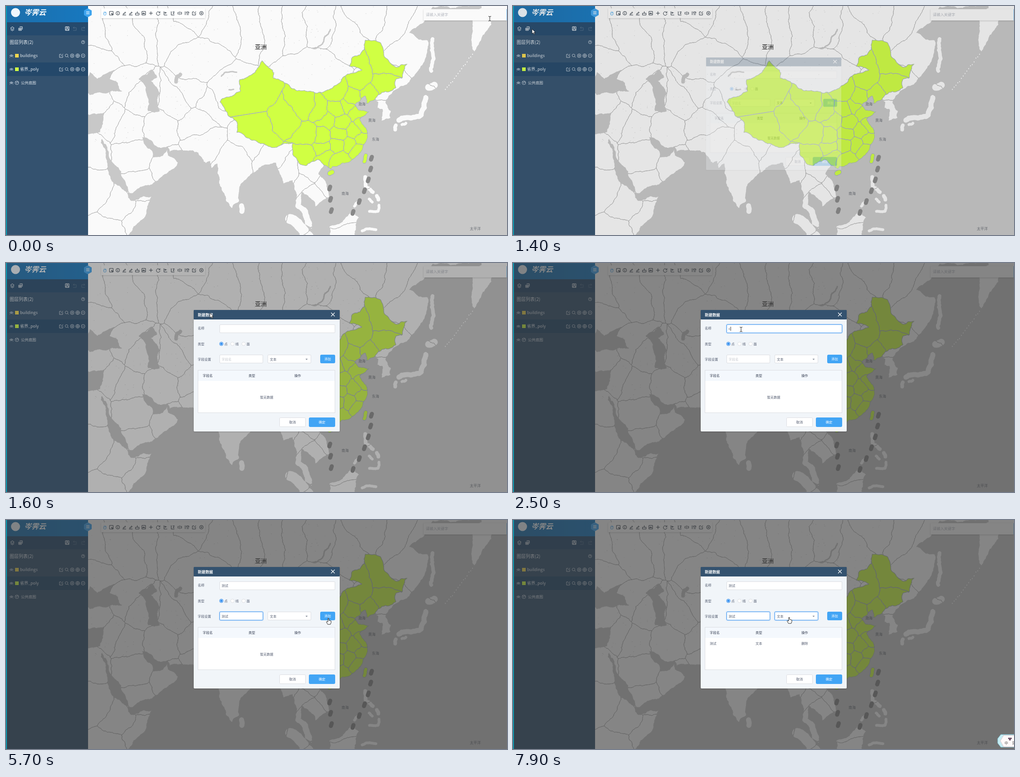
An HTML page with a canvas that plays this animation: 1105 by 507 pixels, repeating every 8000 ms.

```html
<!DOCTYPE html>
<html lang="zh">
<head>
<meta charset="utf-8">
<style>
html,body{margin:0;width:100%;height:100%;overflow:hidden}
canvas,svg{position:absolute;left:0;top:0;width:1105px;height:507px}
canvas{background:#c8c8c8}
text{font-family:"Noto Sans CJK SC","Noto Sans",sans-serif;white-space:pre}
</style>
</head>
<body>
<canvas id="map" width="1105" height="507"></canvas>
<svg id="ui" viewBox="0 0 1105 507"></svg>
<script>
// ---------- map: a few lon,lat points in Mercator, joined by fractal lines
const ctx = document.getElementById('map').getContext('2d');
const LAND = '#fafafa', SEA = '#c8c8c8', LIME = '#d0ff43', EDGE = '#a2a8cf';

const project = s => s.trim().split(/\s+/).map(p => {
  const [lon, lat] = p.split(',').map(Number);
  return [lon * 6.75 - 24.5, 502 - 386.7 * Math.log(Math.tan(Math.PI / 4 + lat * Math.PI / 360))];
});
const hash = (x, y) => { const s = Math.sin(x * 12.9898 + y * 78.233) * 43758.5453; return s - Math.floor(s) - .5; };

// The offset depends only on the two ends, so shared edges coincide.
function wiggle(a, b, out, longest) {
  const len = Math.hypot(a[0] - b[0], a[1] - b[1]);
  if (len < 2.5 || len > longest) return out.push(b);
  const sx = a[0] + b[0], sy = a[1] + b[1];
  const m = [sx / 2 + len * .25 * hash(sx, sy), sy / 2 + len * .25 * hash(sy, sx)];
  wiggle(a, m, out, longest);
  wiggle(m, b, out, longest);
}
function trace(points, closed = true, longest = 110) {
  const out = [points[0]];
  (closed ? [...points.slice(1), points[0]] : points.slice(1)).forEach((p, i) => wiggle(points[i], p, out, longest));
  ctx.beginPath();
  out.forEach(p => ctx.lineTo(...p));
}
function area(s, color) { trace(project(s)); ctx.fillStyle = color; ctx.fill(); }
function strip(width, s, color) {
  trace(project(s), false);
  ctx.lineCap = ctx.lineJoin = 'round';
  ctx.strokeStyle = color; ctx.lineWidth = width; ctx.stroke();
}
// Borders are the edges of the cells nearest to each seed.
function borders(seeds, color) {
  ctx.strokeStyle = color; ctx.lineWidth = 1;
  seeds.forEach(p => {
    let cell = [[-60, -60], [1200, -60], [1200, 600], [-60, 600]];
    seeds.forEach(q => {
      if (q === p) return;
      const side = v => (v[0] - (p[0] + q[0]) / 2) * (q[0] - p[0]) + (v[1] - (p[1] + q[1]) / 2) * (q[1] - p[1]);
      cell = cell.flatMap((v, i) => {
        const w = cell[(i + 1) % cell.length], a = side(v), b = side(w), k = a / (a - b);
        return [...(a <= 0 ? [v] : []), ...(a * b < 0 ? [[v[0] + (w[0] - v[0]) * k, v[1] + (w[1] - v[1]) * k]] : [])];
      });
    });
    trace(cell.map(v => v.map(Math.round)), true, 500);
    ctx.stroke();
  });
}

const west = `26,37 36,36.8 35,33 34.3,31.3 26,31.5 26,-2 41.5,-2 46,2.5 51.2,11.8 44.5,10.4 43.3,12.8 39.3,15.8 37,21 32.6,29.6 34.2,27.8
 34.9,29.4 39,22 42.7,16.3 43.3,13 45,12.9 52.3,16.5 57.8,20.3 59.8,22.4 56.6,24.5 56.3,26.2 54,24.1 51.6,24.1 51.2,26.1 48,30 51,29
 54,26.7 56.5,27.1 57.2,25.7 66.5,25.4 75,64 26,64`;
const south = `57.2,25.7 66.5,25.4 69,22.3 70.3,22.9 70.8,20.8 72.6,22.2 72.8,19 74.8,13 77.5,8.1 79.8,10.3 80.2,15.6 87,21.2 91.8,22.4
 94.3,16 97.2,17 98.7,12 98.3,8.3 101.3,2.8 103.5,1.3 103.4,3.8 99.9,9.2 100,13.3 102.3,12.1 104.8,8.6 109.2,11.7 109,13.7 105.7,18.9
 107.5,21.6 107,45 57,45`;
const chinaCoast = `107.5,21.6 109.8,20.4 110.5,21.2 113.5,22.2 116.5,23 119.6,25.5 121.9,29.8 121.8,31.3 119.3,34.9 122.5,36.9 119,37.3
 117.7,38.7 121,40.8 121.2,38.8 124.2,39.9`;
const pacific = `125.2,39.4 125,37.9 126.7,37.5 126.4,34.5 129.2,35.2 129.4,37 127.6,39.3 130.7,42.3 135.5,44.4 140.4,49 141.4,53.2
 135.3,54.7 143,59.3 155,59.4 155,64 60,64 60,28`;
const chinaLand = `126.5,41.7 131.1,42.9 131,44.8 133,45.1 134.9,48.3 131,47.7 127.5,49.8 126,52.8 121,53.3 119.2,50.3 116.7,49.8 115.7,47.8
 119.8,47 111.8,43.7 105,41.6 97,42.8 91,45.2 90.8,47 87.3,49.1 85.5,47.1 82.3,45.4 80,44.9 80.2,42.1 74,40.1 73.5,39.4 76,36 78.8,34.3
 79,31.2 84,28.9 88,27.9 92,26.9 97.2,28.2 97.6,24.3 99.3,22.2 101.7,21.4 105.4,23.3`;
const kamchatka = '164,64 156.5,57.5 156.7,51 160,54.5 163,58 172,60 172,64';
const borneo = '109.3,2 113,3.2 116.8,7 119,5 117.6,.5 117.5,-2 109.3,-2';
const blackSea = '27,42 31,46.5 33.5,45 39.2,47 37.5,45 41.6,42 36,41.5 31,41.1';
const caspian = '47,45 51.5,47 53,45.3 51,44.5 54,41.5 53,40 53.9,37 50,37 50,40.4';
const islands = { // width: spines
  6: ['122.4,7 125.2,7 125.5,9', '122.3,11 123.3,10', '117.5,8.7 119.2,10.6', '133,33.4 134.3,33.8', '120,.6 124.5,1'],
  8: ['142.6,46.8 143,53.5', '121,18 121.2,15 123.5,13.2', '124.8,12 125.3,10.8', '130.8,32 131,33.2'],
  11: ['132,34.6 136,35.2 139.3,36 140.8,40.5', '80.7,7 80.6,8.8'],
  15: ['141.7,43 143.6,43.5'],
  22: ['96.5,4.5 103,-2']
};
const lakes = { 3: ['74,45.6 75,46.4 79,46.5', '104,51.6 107,52.5 109.6,55.3', '76.5,42.4 78,42.5'], 8: ['59.2,44.3 59.5,45.5 60.6,46'] };
const strips = (set, color) => Object.entries(set).forEach(([w, list]) => list.forEach(s => strip(+w, s, color)));

const countries = `33,39 38,35 43.5,33 45,24 47,15.5 57,21 54,32.5 59,39.5 63.5,42 67,48.5 66,33.5 68,28 78,22 84,28.4 90,24.5 95.5,21
 101,15.5 103.5,19.5 105,12.5 108,15 104,46.5 75,41.5 71,38.8 44,42 47,40.3 34,49 41,8.500 46,5 38,.5 31,14 30,26 127,40.2 127.5,36 114,0 114,3.5`;
const provinces = `85,41.5 87,31.5 95.5,35.5 101,38.3 102.5,30.5 101.5,25 107,27 106.8,30 108.5,34.5 105.8,37.3 111.8,37.5 113.5,34 112.5,31
 111.8,27.5 108.5,24 113.3,23.6 115.8,27.5 118,26 120,29 117.3,31.8 119.8,33.3 118.3,36.3 115.2,38.5 116.4,40.2 112,41.5 119,45 123,41.3 126.5,43.5 128,47`;

[west, south, chinaCoast + ' ' + pacific, kamchatka, borneo].forEach(s => area(s, LAND));
strips(islands, LAND);
ctx.globalCompositeOperation = 'source-atop';
const siberia = Array.from({ length: 14 }, (_, i) => `${34 + i * 8},${56 + 6 * hash(i, 2)}`).join(' ');
borders(project(countries + ' ' + siberia), '#b2b2b2');
ctx.fillStyle = SEA;
for (let i = 0; i < 350; i++) ctx.fillRect(500 + hash(i, 3) * 640, 150 + hash(i, 7) * 300, 1 + hash(i, 5), 1);
ctx.globalCompositeOperation = 'source-over';
[blackSea, caspian].forEach(s => area(s, SEA));
strips(lakes, SEA);
ctx.fillStyle = LAND;
for (let i = 0; i < 16; i++) ctx.fillRect(968 + i * 4, 186 - i * 5.4 + hash(i, 2) * 5, 2, 2);

for (const [w, s] of [[9, '120.7,22.700 121.2,24.6'], [11, '109.4,19.1 110.2,19.5']]) {
  strip(w, s, EDGE);
  strip(w - 2, s, LIME);
}
ctx.save();
area(chinaCoast + ' ' + chinaLand, LIME);
ctx.strokeStyle = EDGE; ctx.lineWidth = 2;
ctx.clip();
ctx.stroke();
borders(project(provinces), EDGE);
ctx.restore();
ctx.strokeStyle = '#888';
for (let i = 0; i < 9; i++) { // dashes curving down the sea
  const a = i / 8 * 2.6, x = 715 + 92 * Math.cos(a / 1.66) * (i < 6 ? 1 : .1), y = i < 6 ? 334 + i * 24 : 600 - i * 25;
  ctx.beginPath(); ctx.moveTo(x, y); ctx.lineTo(x - 2, y + 6); ctx.stroke();
}

// ---------- interface
const T = (x, y, s, size = 7.3, color = '#515a6e', extra = '') =>
  `<text x="${x}" y="${y + size * .36}" font-size="${size}" fill="${color}" ${extra}>${s}</text>`;
const R = (x, y, w, h, color, extra = '') => `<rect x="${x}" y="${y}" width="${w}" height="${h}" fill="${color}" ${extra}/>`;
const icon = (x, y, d, color = '#222', w = 1) => `<path transform="translate(${x} ${y})" d="${d}" fill="none" stroke="${color}" stroke-width="${w}"/>`;
const disc = (r, x = 0, y = 0) => `M${x - r} ${y}a${r} ${r} 0 1 0 ${2 * r} 0a${r} ${r} 0 1 0 ${-2 * r} 0`;
const MID = 'text-anchor="middle"', BOLD = 'font-weight="700"', BLUE = '#42a5f5', BORDER = '#dcdee2', SHADOW = 'filter="url(#shadow)"';
const box = (x, y, w, id) => R(x + .5, y + .5, w - 1, 18, '#fff', `rx="1.5" stroke="${BORDER}" id="${id}"`);

const square = 'M-4-4H4V4H-4Z', plus = 'M-4 0H4M0-4V4', edit = 'M3-1V4H-4V-3H0M-1 1L4-4', zoom = disc(3, -.5, -.5) + 'M2 2L4 4';
const eye = 'M-4 0Q0-4 4 0Q0 4-4 0M-3 3L-4 4M3 3L4 4' + disc(1.2), axes = 'M-3-4V4H4', pen = 'M-4 4H4M-3 2L2-3L3-1L-1 2Z';
const undo = 'M-1-4L-4-2L-1 0M-4-2H3V4H-4', stack = 'M-4-1L0-4L4-1L0 2ZM-4 2L0 5L4 2', cross = 'M-4-4L4 4M4-4L-4 4';
const tools = ['M-2 4L-3 0M-2 1V-3M0 0V-4M2 0V-3L3 1L2 4H-2', square + 'M0 0L4 2L2 4Z', disc(4) + 'M0-1V2.5M0-3V-2', pen, pen, 'M-4 0H4V4H-4ZM0-4V0',
  square + 'M-3 2L0-1L3 2M-3 1H2M-2 0H1', plus, 'M3-2A4 4 0 1 0 4 1M4-4V-1H1', axes + 'M0 1V-3M-2-1H3', axes + 'M0-3H4L1 1H4',
  'M0-4V4M-2-2H-4V2H-2M2-2H4V2H2', 'M-4-4V4M-1-3H4V0H-1ZM-1 3H4', edit, disc(4) + disc(1.2)];
const layer = (y, name, color) => icon(12, y, eye, '#c3d0dc', .9) + R(20, y - 4, 8, 8, color) + T(31, y, name, 9, '#e5ebf0') +
  [edit, zoom, disc(4) + disc(1.5), disc(4) + plus, disc(4) + 'M-2 0H2'].map((d, i) => icon(122 + i * 12, y, d, '#d5dee6', .9)).join('');
const place = (x, y, s) => T(x, y, s, 8, '#686c73', MID);

const page =
  R(0, 0, 2, 507, '#0a9db4') + R(2, 0, 179, 507, '#34526f') + R(2, 0, 179, 36, 'url(#head)') + R(2, 36, 179, 29, '#254a6d') + R(2, 125, 179, 30, '#24486a') +
  '<circle cx="21" cy="14.5" r="10" fill="#eef6fc"/>' + T(40, 14.5, '岑霁云', 16, '#fff', BOLD + ' font-style="italic"') +
  icon(14, 50, stack, '#fff') + icon(32, 50, 'M-2-4H4V2M-4-1H2V4H-4ZM-1 0V3M-3 1.5H1', '#fff') + icon(135, 50, square + 'M-2 4V0H2V4M-1-4V-2H2', '#fff') +
  icon(152, 50, undo, '#4f6c87') + `<g transform="translate(340 0) scale(-1 1)">${icon(170, 50, undo, '#4f6c87')}</g>` +
  T(8, 80, '图层列表(2)', 10, '#e5ebf0') + icon(170, 80, disc(3.5) + 'M-1-1Q0-3 1-1L0 1', '#d5dee6', .9) +
  layer(110, 'buildings', '#f2d74e') + layer(140, '省界_poly', LIME) +
  icon(12, 170, eye, '#c3d0dc', .9) + icon(24, 170, disc(4) + 'M-3-2L0-1L-1 2M1-4L2-1L4 0', '#c3d0dc', .9) + T(33, 170, '公共底图', 8.4, '#e5ebf0') +
  '<path d="M180.5 5L189 10V20L180.5 25L172 20V10Z" fill="#3fa4ee"/>' + icon(180.5, 15, 'M-3.5-2.5h7m0 2.5h-7m0 2.5h7', '#fff') +
  R(210, 5, 229, 22, '#fff', SHADOW + ' opacity=".92"') + tools.map((d, i) => icon(218 + i * 14.3 + Math.max(0, i - 6) * 1.6, 16, d, i ? '#252f3a' : '#54abea')).join('') +
  R(921, 7, 184, 25, '#fafafa', SHADOW) + R(1104, 7, 1, 25, '#70baf2') + T(926, 19.5, '请输入关键字', 8.2, '#b5b9c0') + T(562, 90.5, '亚洲', 13, '#111', MID) +
  place(785, 217.5, '渤海') + place(807, 253.5, '黄海') + place(815, 295, '东海') + place(748, 415, '南海') + place(1035, 493, '太平洋');

const radio = (x, s) => `<circle cx="${x}" cy="179" r="4" fill="#fff" stroke="${BORDER}"/>` + T(x + 6.5, 179, s);
const button = (x, y, w, h, s, primary) =>
  R(x + .5, y + .5, w - 1, h - 1, primary ? BLUE : '#fff', `rx="2" stroke="${primary ? BLUE : BORDER}"`) + T(x + w / 2, y + h / 2, s, 7.3, primary ? '#fff' : '#515a6e', MID);
const columns = (y, names, color) => names.map((s, i) => T(434 + i * 101, y, s, 7.3, color)).join('');

const dialog =
  R(414, 104, 322, 269, '#f1f5f9', 'rx="2" ' + SHADOW) + R(414, 104, 322, 21, '#34526f', 'rx="1"') + T(423, 114.5, '新建数据', 8.4, '#fff', BOLD) +
  icon(721, 114, cross, '#fff', 1.2) + T(423, 144.5, '名称') + T(423, 179, '类型') + T(423, 213, '字段设置') +
  box(471, 136, 255, 'nameBox') + box(471, 203, 96, 'fieldBox') + box(577, 203, 96, 'select') +
  radio(475, '点') + radio(499.5, '线') + radio(524, '面') + '<circle cx="475" cy="179" r="3.2" fill="#2d8cf0" stroke="#fff"/>' + icon(475, 179, disc(4), '#2d8cf0') +
  T(582, 213, '文本') + '<path d="M660.5 212h5l-2.5 2.5Z" fill="#777f8d"/>' + button(693, 203, 33, 19, '添加', true) +
  R(423.5, 237.5, 302, 94, '#fff', `stroke="${BORDER}"`) + R(424, 238, 301, 23, '#f4f8fd') + columns(249.5, ['字段名', '类型', '操作'], '#333c50') +
  `<g id="empty">${T(575, 297, '暂无数据', 7.3, '#515a6e', MID)}</g><g id="row">${columns(273, ['测试', '文本', '删除'])}</g>` +
  button(603, 342, 58, 21, '取消') + button(668, 342, 58, 21, '确定', true) +
  T(475.5, 145.5, '', 7.3, '#515a6e', 'id="name"') + T(475.5, 213.5, '', 7.3, '#515a6e', 'id="field"') + R(480, 141, 1, 9, '#333', 'id="caret"');

const ime = `<g id="ime">${R(484, 0, 211, 53, '#fff', 'id="imeBox" stroke="#c9d8e4" ' + SHADOW)}${T(491, 14, '', 9, '#333', 'id="pinyin"')}
  <path d="M484 25h206" stroke="#e3eaf0"/>${T(491, 39, '', 9, '#333', 'id="words"')}</g>`;
const imeBar = `<g id="imeBar"><path d="M1076 475h34v28h-34l-7-9v-10Z" fill="#c6ecf3" stroke="#7ebfd0"/><path d="M1082 477h28v25h-28l-7-13Z" fill="#fffafa" stroke="#d9aeb4" stroke-dasharray="2 1"/>
  <path d="M1092 482h8v3h-2v3h-4v-3h-2Z" fill="#71566c"/>${T(1084, 494, '中', 8, '#555')}${T(1101, 494, '简', 8, '#555')}</g>`;
const cursors = {
  beam: '<path d="M-3-5H-1L0-4L1-5H3M0-4V4M-3 5H-1L0 4L1 5H3" fill="none" stroke="#222"/>',
  arrow: '<path d="M0 0V10.5L2.5 8L4.3 12L6 11.2L4.2 7.5H7.5Z" fill="#fff" stroke="#111" stroke-width=".8"/>',
  hand: '<path d="M-1 1Q0-.8 1 1V5L6 6.5V10L4.5 14H-1.500L-4.5 8.5L-3 7.5L-1 9Z" fill="#fff" stroke="#111" stroke-width=".9"/>'
};

document.getElementById('ui').innerHTML = `<defs><linearGradient id="head"><stop stop-color="#1c6fac"/><stop offset="1" stop-color="#1778bf"/></linearGradient>
  <filter id="shadow" x="-10%" y="-20%" width="120%" height="140%"><feDropShadow dx="0" dy="1" stdDeviation="1.5" flood-opacity=".2"/></filter></defs>
  ${page}${R(2, 0, 1103, 507, '#373737', 'id="mask"')}<g id="dialog">${dialog}</g>${ime}${imeBar}
  <g id="cursor">${Object.entries(cursors).map(([k, s]) => `<g id="${k}">${s}</g>`).join('')}</g>`;

// ---------- timeline
const stops = [ // leave, arrive, x, y, cursor there
  [0, 0, 1067, 28, 'beam'], [0, 900, 31, 50, 'hand'], [1300, 1400, 42, 51, 'arrow'], [1400, 1600, 450, 111, 'arrow'], [1600, 2200, 503, 147, 'beam'],
  [3200, 3900, 501, 211, 'beam'], [5200, 5600, 711, 217, 'hand'], [6000, 6600, 501, 212, 'beam'], [7300, 7600, 609, 215, 'hand']];
const clamp = v => Math.max(0, Math.min(1, v));
const ease = v => v * v * (3 - 2 * v);
const $ = id => document.getElementById(id);
const show = (id, on) => { $(id).style.display = on ? '' : 'none'; };
const set = (id, attrs) => { for (const k in attrs) $(id).setAttribute(k, attrs[k]); };
const focus = (id, on) => {
  set(id, { stroke: on ? '#57a3f3' : BORDER });
  $(id).style.filter = on ? 'drop-shadow(0 0 1px #2d8cf0)' : 'none';
};
// Pinyin grows beside the candidate list, then turns into the chosen word.
function typing(t, from, to) {
  if (t < from) return { text: '', list: 0 };
  if (t >= to) return { text: '测试', list: 0 };
  const u = (t - from) / (to - from), list = u < .1 ? 0 : u < .6 ? 1 : 2;
  return { text: 'ceshi'.slice(0, 1 + 2 * list), list, live: true };
}

function render(t) {
  const open = clamp((t - 1340) / 230);
  set('mask', { opacity: .6 * clamp((t - 1320) / 440) });
  set('dialog', { opacity: open, transform: `translate(575 238.5) scale(${.9 + .1 * open}) translate(-575 -238.5)` });

  const added = t >= 5900, inField = t >= 4200;
  const name = typing(t, 2500, 3100), field = added ? typing(t, 6900, 7300) : typing(t, 4600, 5200);
  const input = inField ? field : name;
  $('name').textContent = name.text;
  $('field').textContent = field.text || '字段名';
  set('field', { fill: field.text ? '#515a6e' : '#c5c8ce' });
  focus('nameBox', t >= 2200 && !inField);
  focus('fieldBox', inField && !(added && t < 6500));
  focus('select', t >= 7500);
  show('row', added);
  show('empty', !added);

  show('caret', input.live || (t >= 7300 && t < 7900));
  set('caret', { x: 476 + (input.live ? input.text.length * 3.7 : 14), y: inField ? 209 : 141 });
  show('ime', input.list);
  set('ime', { transform: `translate(0 ${inField ? 231 : 163})` });
  set('imeBox', { width: input.list === 2 ? 251 : 211 });
  $('pinyin').textContent = input.text.replace('ces', "ce's");
  $('words').textContent = input.list === 2 ? '1.测试  2.侧室  3.测时  4.测  5.策  6.册' : '1.测试  2.才  3.从  4.此  5.错';
  show('imeBar', t >= 6700);

  const i = stops.filter(s => s[0] <= t).length - 1, [leave, arrive, x, y, kind] = stops[i], from = stops[Math.max(0, i - 1)];
  const p = clamp((t - leave) / (arrive - leave || 1)), e = ease(p);
  set('cursor', { transform: `translate(${from[2] + (x - from[2]) * e} ${from[3] + (y - from[3]) * e})` });
  const shape = p === 0 ? from[4] : p < 1 ? 'arrow' : kind;
  for (const k in cursors) show(k, k === shape);
}
const start = performance.now();
(function tick() {
  render(Math.floor((performance.now() - start) % 8000 / 100) * 100);
  requestAnimationFrame(tick);
})();
</script>
</body>
</html>
```
